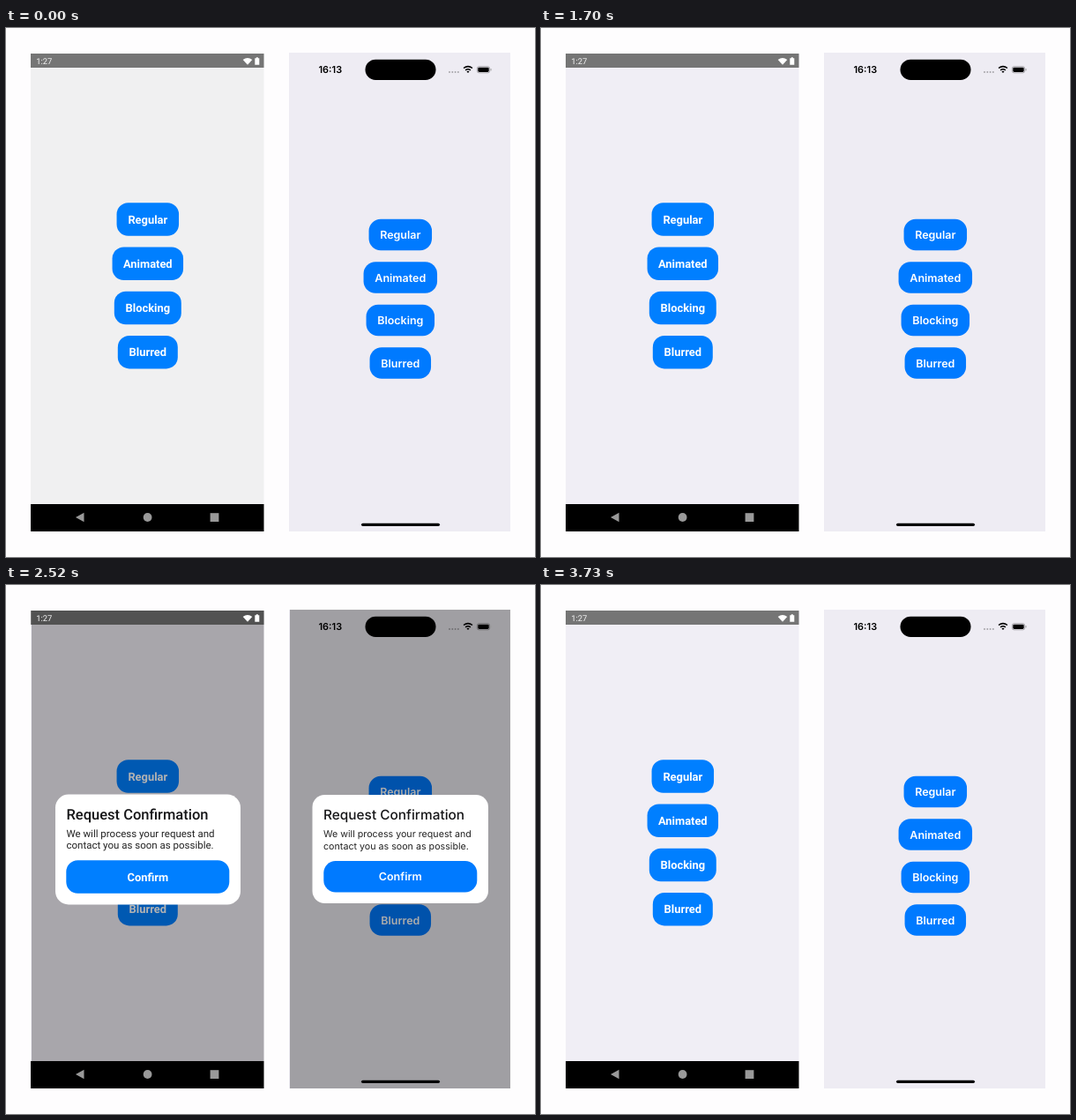
Write an HTML page that moves like this. It is 600x600 px and loops after 3.76 s.

```html
<!DOCTYPE html>
<html lang="en">
<head>
<meta charset="utf-8">
<title>Dialog demo</title>
<style>
  html, body { margin: 0; width: 100%; height: 100%; overflow: hidden; background: #fefdfe; }
  svg { display: block; width: 600px; height: 600px; }
  text { text-rendering: geometricPrecision; }
  .android { font-family: Roboto, sans-serif; }
  .ios { font-family: Inter, sans-serif; }
</style>
</head>
<body>
<svg id="stage" viewBox="0 0 600 600"></svg>
<script>
const LOOP = 3760;
const NS = 'http://www.w3.org/2000/svg';
const stage = document.getElementById('stage');

function add(parent, tag, attrs, content) {
  const node = document.createElementNS(NS, tag);
  for (const key in attrs) node.setAttribute(key, attrs[key]);
  if (content) node.textContent = content;
  parent.append(node);
  return node;
}

const rect = (parent, x, y, width, height, fill, rx = 0) =>
  add(parent, 'rect', { x, y, width, height, fill, rx });

const label = (parent, x, y, size, weight, fill, content, anchor = 'start') =>
  add(parent, 'text', {
    x, y, fill, 'font-size': size, 'font-weight': weight, 'text-anchor': anchor
  }, content);

function button(parent, cx, y, width, height, style, content) {
  const g = add(parent, 'g', {});
  rect(g, cx - width / 2, y, width, height, style.blue, style.radius);
  label(g, cx, y + height / 2 + 4.6, style.buttonFont, style.buttonWeight, '#fff', content, 'middle');
  return g;
}

const NAMES = ['Regular', 'Animated', 'Blocking', 'Blurred'];

const PHONES = {
  android: {
    screen: [28, 29, 264.5, 512], dimArea: [29, 29, 263.5, 511], dim: 0.3, bg: '#f0eef5',
    blue: '#007fff', radius: 13, buttonFont: 12.9, buttonWeight: 700,
    cx: 160.8, top: 198.3, step: 50.2, height: 37.5, widths: [70.5, 80.5, 76, 68],
    card: [56, 237.5, 210, 125, 15], cy: 300, textX: 68.5,
    title: [265.7, 16.5, 500], body: [285.7, 299.3, 11.5], confirm: [312.3, 185, 37.5],
    open: 1954, close: 3265
  },
  ios: {
    screen: [321, 28, 251, 543], dimArea: [322, 28, 250, 543], dim: 0.33, bg: '#eeecf3',
    blue: '#007aff', radius: 13.5, buttonFont: 12.5, buttonWeight: 600,
    cx: 447.3, top: 216.8, step: 48.5, height: 35.5, widths: [71.5, 83.5, 77.5, 69.5],
    card: [347.5, 238, 199.5, 123, 14], cy: 299.5, textX: 360,
    title: [265.6, 15.4, 500], body: [285.7, 299.5, 10.7], confirm: [313, 174, 35.5],
    open: 1975, close: 3269
  }
};

function androidBar(g) {
  rect(g, 28, 29, 264.5, 16, '#757575');
}

function androidChrome(g) {
  label(g, 34.3, 41, 9.4, 400, '#f4f4f4', '1:27');
  add(g, 'path', { d: 'M268.7 36 Q274 31.8 279.3 36 L274 41.8Z', fill: '#fff' });
  add(g, 'path', { d: 'M282.3 34.2h1.5v-1h2v1h1.5v7.6h-5z', fill: '#fff' });
  rect(g, 28, 540, 264.5, 31, '#000');
  add(g, 'path', { d: 'M79 555 88.5 549.8V560.2Z', fill: '#999' });
  add(g, 'circle', { cx: 160.6, cy: 555, r: 4.9, fill: '#999' });
  rect(g, 231.6, 550.2, 9.8, 9.8, '#999');
}

function iosChrome(g) {
  label(g, 367.8, 51.3, 10.9, 600, '#000', '16:13', 'middle');
  rect(g, 407.5, 35.7, 80, 23.3, '#000', 11.65);
  for (let i = 0; i < 4; i++) {
    add(g, 'circle', { cx: 503 + i * 3.3, cy: 50, r: 1, fill: '#000', opacity: 0.3 });
  }
  for (const [r, y] of [[5, 45.5], [2.9, 47.8]]) {
    add(g, 'path', {
      d: `M${524 - r} ${y}Q524 ${y - r * 0.75} ${524 + r} ${y}`,
      fill: 'none', stroke: '#000', 'stroke-width': 1.5
    });
  }
  add(g, 'path', { d: 'M522.4 49.3Q524 48 525.6 49.3L524 51Z', fill: '#000' });
  add(g, 'rect', {
    x: 534.3, y: 43.7, width: 14.4, height: 7.2, rx: 2.3,
    fill: 'none', stroke: '#000', 'stroke-opacity': 0.4, 'stroke-width': 0.7
  });
  rect(g, 535.3, 44.7, 12.4, 5.2, '#000', 1.4);
  rect(g, 549.5, 46, 1, 2.6, '#999', 0.5);
  rect(g, 403, 561.7, 89, 3.2, '#000', 1.6);
}

function buildPhone(name) {
  const p = PHONES[name];
  const g = add(stage, 'g', { class: name });
  p.back = rect(g, ...p.screen, p.bg);
  if (name === 'android') androidBar(g);
  NAMES.forEach((text, i) =>
    button(g, p.cx, p.top + i * p.step, p.widths[i], p.height, p, text));
  p.shade = rect(g, ...p.dimArea, '#000');
  (name === 'android' ? androidChrome : iosChrome)(g);

  const dialog = p.dialog = add(g, 'g', {});
  const [x, y, w, h, r] = p.card;
  const [titleY, titleSize, titleWeight] = p.title;
  const [line1, line2, bodySize] = p.body;
  const [confirmY, confirmW, confirmH] = p.confirm;
  rect(dialog, x, y, w, h, '#fff', r);
  label(dialog, p.textX, titleY, titleSize, titleWeight, '#161618', 'Request Confirmation');
  label(dialog, p.textX, line1, bodySize, 400, '#222', 'We will process your request and');
  label(dialog, p.textX, line2, bodySize, 400, '#222', 'contact you as soon as possible.');
  p.confirmButton = button(dialog, p.cx, confirmY, confirmW, confirmH, p, 'Confirm');
}

const clamp = v => Math.min(1, Math.max(0, v));
const inOut = v => v < 0.5 ? 2 * v * v : 1 - 2 * (1 - v) ** 2;
const ramp = (t, start, length) => inOut(clamp((t - start) / length));

function drawPhone(p, t) {
  const shown = ramp(t, p.open, 200) - ramp(t, p.close, 200);
  const pressed = ramp(t, p.close - 150, 150) - ramp(t, p.close, 250);
  const scale = 0.3 + 0.7 * shown;
  p.shade.setAttribute('opacity', p.dim * shown);
  p.dialog.setAttribute('opacity', shown);
  p.dialog.setAttribute('transform',
    `translate(${p.cx} ${p.cy}) scale(${scale}) translate(${-p.cx} ${-p.cy})`);
  p.confirmButton.setAttribute('opacity', 1 - 0.8 * pressed);
}

function draw(now) {
  const t = now % LOOP;
  const tint = clamp(t / 900);
  for (const name in PHONES) drawPhone(PHONES[name], t);
  PHONES.android.back.setAttribute('fill',
    `rgb(240, ${Math.round(240 - 2 * tint)}, ${Math.round(241 + 4 * tint)})`);
}

Object.keys(PHONES).forEach(buildPhone);
const start = performance.now();
function tick() {
  draw(performance.now() - start);
  requestAnimationFrame(tick);
}
tick();
</script>
</body>
</html>
```
